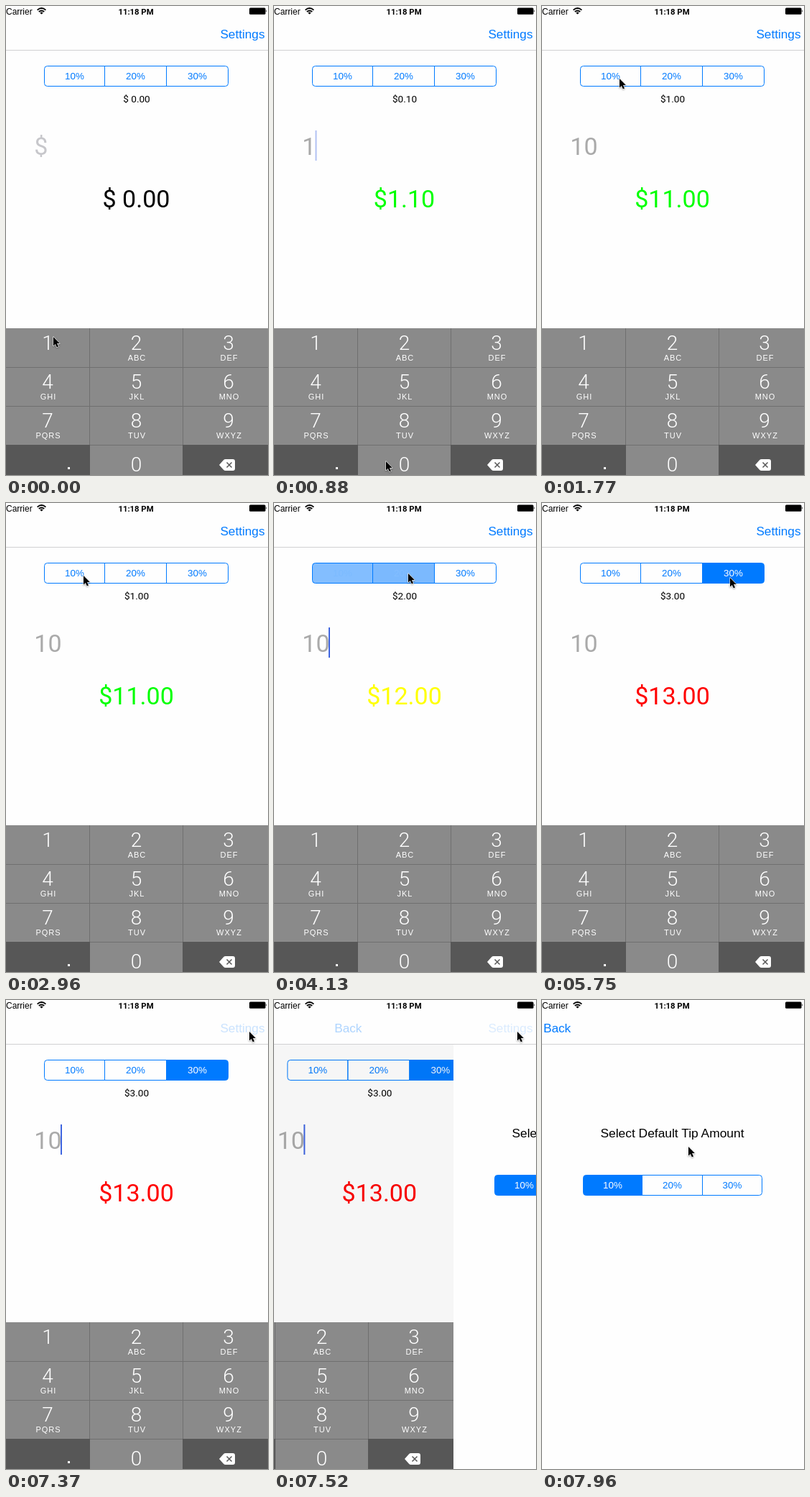
Animation, 365 px wide and 652 px high, one loop 8 s. Source, as an HTML page:

```html
<!DOCTYPE html>
<html lang="en">
<head>
<meta charset="utf-8">
<title>Tip calculator</title>
<style>
  html, body { margin: 0; width: 100%; height: 100%; overflow: hidden; background: #fefefe; }
  svg { display: block; width: 365px; height: 652px; }
  text { font-family: "Liberation Sans", Arial, sans-serif; }
  .mid { text-anchor: middle; }
  .nav { font-size: 17.2px; fill: #007aff; }
  .seg { font-size: 13.4px; }
  .num { font-family: Roboto, "Liberation Sans", sans-serif; }
  .big { font-size: 34px; }
  .digit { font-size: 28px; font-weight: 300; fill: #fff; }
  .letters { font-size: 11px; fill: #fff; letter-spacing: 1px; }
</style>
</head>
<body>
<svg viewBox="0 0 365 652">
  <rect width="365" height="652" fill="#fefefe"/>

  <g id="main">
    <g id="tipControl"></g>
    <text id="tip" class="num mid" x="182" y="134" font-size="13.6"></text>
    <text id="bill" class="num big" x="39.3" y="206.5"></text>
    <rect id="caret" y="173" width="2" height="42" fill="#4066e0"/>
    <text id="total" class="num big mid" x="181.5" y="280"></text>
  </g>
  <rect id="dim" y="62" width="365" height="590"/>

  <g id="keys"></g>

  <g id="settings">
    <rect y="62" width="365" height="590" fill="#fefefe"/>
    <text class="mid" x="181.5" y="190.5" font-size="17.4">Select Default Tip Amount</text>
    <g id="defaultControl"></g>
  </g>

  <rect width="365" height="61" fill="#fefefe"/>
  <rect y="61" width="365" height="1" fill="#d0d0d2"/>
  <text id="settingsLink" class="nav" x="360.5" y="45" text-anchor="end">Settings</text>
  <text id="backLink" class="nav" y="45">Back</text>

  <text x="0" y="11.5" font-size="12">Carrier</text>
  <g fill="none" stroke="#000" stroke-width="1.9">
    <path d="M43.6 5.6Q49.5 .6 55.4 5.6M45.8 8Q49.5 4.9 53.2 8"/>
    <path d="M49.5 11.6L47.3 9.4Q49.5 7.8 51.7 9.4Z" fill="#000" stroke="none"/>
  </g>
  <text class="num mid" x="181" y="11.5" font-size="11.3" font-weight="700">11:18 PM</text>
  <rect x="339" y="2.5" width="22.5" height="9.3" rx="1.5"/>
  <path d="M362.2 5.2Q364 7 362.2 8.8Z"/>

  <path id="cursor" d="M1 1v12.5l2.8-2.6 2 4.4 2.2-.9-2-4.3h3.9z"
        stroke="#fff" stroke-width="1.2" paint-order="stroke" stroke-linejoin="round"
        style="filter:drop-shadow(0 1px 1px rgba(0,0,0,.35))"/>
</svg>

<script>
const $ = id => document.getElementById(id);
const LOOP = 8000, STEP = 147.4;
const BLUE = '#007aff', KEY = '#8a8a8a', DARK_KEY = '#575757';

function add(parent, tag, attrs, text = '') {
  const el = document.createElementNS('http://www.w3.org/2000/svg', tag);
  set(el, attrs);
  el.textContent = text;
  parent.append(el);
  return el;
}

function set(el, attrs) {
  for (const name in attrs) el.setAttribute(name, attrs[name]);
}

// Segmented control; returns a function that sets each segment's fill level.
function segmented(parent, [a, b, c, d], top) {
  const bottom = top + 28;
  const shapes = [
    `M${b} ${top}V${bottom}H${a + 4}q-4 0 -4 -4V${top + 4}q0 -4 4 -4Z`,
    `M${b} ${top}H${c}V${bottom}H${b}Z`,
    `M${c} ${top}H${d - 4}q4 0 4 4V${bottom - 4}q0 4 -4 4H${c}Z`
  ];
  const centres = [(a + b) / 2, (b + c) / 2, (c + d) / 2];
  const parts = shapes.map((path, i) => [
    add(parent, 'path', { d: path, fill: BLUE, stroke: BLUE }),
    add(parent, 'text', { class: 'seg mid', x: centres[i], y: top + 18.5 }, `${i + 1}0%`)
  ]);
  return level => parts.forEach(([shape, label], i) => {
    const v = level(i);
    set(shape, { 'fill-opacity': v });
    set(label, { fill: `rgb(${255 * v},${122 + 133 * v},255)` });
  });
}

function buildKeys(root) {
  const edges = [0, 117, 246, 365], centres = [58, 181.5, 310];
  const letters = ['', 'ABC', 'DEF', 'GHI', 'JKL', 'MNO', 'PQRS', 'TUV', 'WXYZ'];
  const cell = (col, row, fill) => add(root, 'rect', {
    x: edges[col], y: 448 + 54 * row, width: edges[col + 1] - edges[col], height: 54, fill
  });
  const keys = [cell(1, 3, KEY)];
  for (let i = 0; i < 9; i++) keys.push(cell(i % 3, Math.floor(i / 3), KEY));
  add(root, 'path', {
    d: 'M0 502.5H365M0 556.5H365M0 610.5H365M116.5 448V652M246.5 448V652',
    stroke: '#6f6f6f', fill: 'none'
  });
  cell(0, 3, DARK_KEY);
  cell(2, 3, DARK_KEY);

  letters.forEach((text, i) => {
    const x = centres[i % 3], y = 448 + 54 * Math.floor(i / 3);
    add(root, 'text', { class: 'num digit mid', x, y: y + 30 }, i + 1);
    add(root, 'text', { class: 'letters mid', x: x + 1, y: y + 45 }, text);
  });
  add(root, 'text', { class: 'num digit mid', x: centres[1], y: 647 }, 0);
  add(root, 'rect', { x: 86, y: 641, width: 3, height: 3, fill: '#fff' });
  add(root, 'path', {
    d: 'M297 638L303 631.2Q304 630 306 630H316Q319 630 319 633V643Q319 646 316 646H306Q304 646 303 644.8Z',
    fill: '#fff'
  });
  add(root, 'path', { d: 'M307.5 634.5l7 7m0 -7l-7 7', stroke: DARK_KEY, 'stroke-width': 1.5 });
  return keys;
}

const setTip = segmented($('tipControl'), [53.5, 137.5, 223.5, 309.5], 83.5);
segmented($('defaultControl'), [57.5, 139.5, 223.5, 306.5], 243.5)(i => i === 0 ? 1 : 0);
const keys = buildKeys($('keys'));

// Pointer strokes: start and end time, then where the pointer comes to rest.
const strokes = [
  [380, 740, 155, 632], [1075, 1327, 124, 232], [1480, 1769, 107, 100],
  [2960, 3200, 186, 97], [4440, 4860, 261, 103],
  [6000, 6485, 346, 39], [6485, 6780, 338, 43], [7540, 7955, 203, 203]
];
const taps = [3020, 4050, 5080];
const colours = ['#0f0', '#ff0', '#f00'];

const clamp = v => Math.max(0, Math.min(1, v));
const ramp = (t, from, to) => clamp((t - from) / (to - from));
const easeOut = u => 1 - (1 - u) ** 2;
const tapped = (t, i) => ramp(t, taps[i], taps[i] + 150);
const money = v => '$' + v.toFixed(2);

function pointerAt(t) {
  let x = 65, y = 459;
  for (const [from, to, endX, endY] of strokes) {
    const u = easeOut(ramp(t, from, to));
    x += (endX - x) * u;
    y += (endY - y) * u;
  }
  return [x, y];
}

// Blink once a second; typing keeps the caret lit for a while.
function caretLevel(t, bill) {
  if (!bill) return 0;
  if (bill === 1) return 1 - .6 * ramp(t, 740, 880);
  const phase = (t + 40) % 1000;
  return Math.min(ramp(phase, 0, 150), 1 - ramp(phase, 590, 720));
}

function move(id, x, y = 0) {
  set($(id), { transform: `translate(${x} ${y})` });
}

function draw(time) {
  // The screen refreshes in coarse steps.
  const k = Math.floor((time % LOOP + 6.5) / STEP), t = k * STEP;

  const bill = k < 2 ? 0 : k < 7 ? 1 : 10;
  const choice = Math.max(0, taps.filter(tap => tap < t).length - 1);
  const tip = bill * (choice + 1) / 10;
  $('bill').textContent = bill || '$';
  set($('bill'), { fill: bill ? '#aaa' : '#c7c7cb' });
  $('tip').textContent = bill ? money(tip) : '$ 0.00';
  $('total').textContent = bill ? money(bill + tip) : '$ 0.00';
  set($('total'), { fill: bill ? colours[choice] : '#000' });
  set($('caret'), { x: bill === 10 ? 76 : 57.5, opacity: caretLevel(t, bill) });
  setTip(i => tapped(t, i) - (i < 2 ? tapped(t, i + 1) : 0));

  set(keys[1], { fill: k === 1 ? DARK_KEY : KEY });
  set(keys[0], { fill: k === 7 ? DARK_KEY : KEY });

  const push = 1 - (1 - ramp(t, 7470, 7870)) ** 3;
  move('main', -110 * push);
  move('keys', -365 * push);
  move('settings', 365 * (1 - push));
  set($('dim'), { opacity: .1 * push });
  set($('settingsLink'), { opacity: (1 - .8 * ramp(t, 7000, 7300)) * (1 - push) });
  set($('backLink'), { opacity: push });
  move('backLink', 2 + 120 * (1 - push));
  move('cursor', ...pointerAt(t));
}

const start = performance.now();
function tick() {
  draw(performance.now() - start);
  requestAnimationFrame(tick);
}
tick();
</script>
</body>
</html>
```
